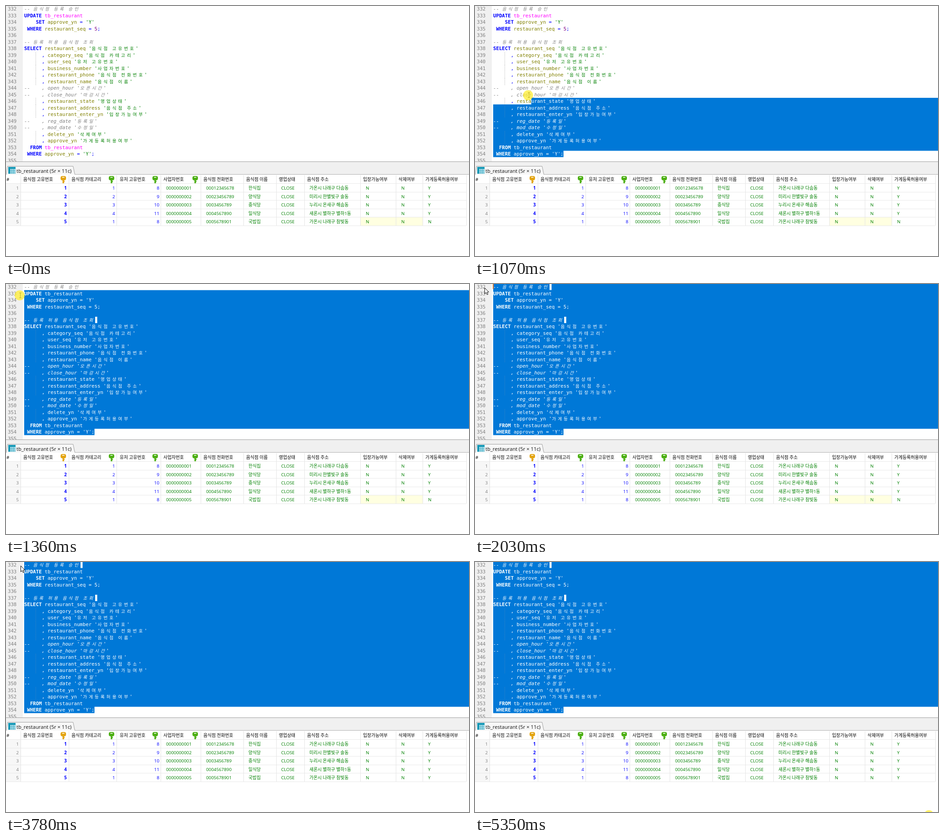
Recreate the animation shown at these times as an HTML page with a canvas. Size 1018 px wide and 550 px high, loop 5420 ms.

```html
<!DOCTYPE html>
<html lang="ko">
<head>
<meta charset="utf-8">
<style>
html, body { margin: 0; width: 100%; height: 100%; overflow: hidden; background: #fff; }
canvas { display: block; }
</style>
</head>
<body>
<canvas id="stage" width="1018" height="550"></canvas>
<script>
const ctx = document.getElementById('stage').getContext('2d');
const LOOP = 5420, COL = 6.44, LEFT = 40, ROW = 14.5, FIRST = 332;
const MONO = '"DejaVu Sans Mono", "Noto Sans CJK KR", monospace';
const SANS = '"Open Sans", "Noto Sans CJK KR", "Noto Sans CJK", sans-serif';

const code = `-- 음식점 등록 승인
UPDATE tb_restaurant
    SET approve_yn = 'Y'
 WHERE restaurant_seq = 5;

-- 등록 허용 음식점 조회
SELECT restaurant_seq '음식점 고유번호'
      , category_seq '음식점 카테고리'
      , user_seq '유저 고유번호'
      , business_number '사업자번호'
      , restaurant_phone '음식점 전화번호'
      , restaurant_name '음식점 이름'
--    , open_hour '오픈시간'
--    , close_hour '마감시간'
      , restaurant_state '영업상태'
      , restaurant_address '음식점 주소'
      , restaurant_enter_yn '입장가능여부'
--    , reg_date '등록일'
--    , mod_date '수정일'
      , delete_yn '삭제여부'
      , approve_yn '가게등록허용여부'
  FROM tb_restaurant
 WHERE approve_yn = 'Y';
`.split('\n');

const isHangul = ch => /[가-힣]/.test(ch);
const tokenColor = s =>
  s.startsWith('--') ? '#808080' :
  /^[A-Z]/.test(s) ? '#0000ff' :
  s.startsWith('tb_') ? '#ff00ff' :
  s.startsWith("'") ? '#008000' :
  /^\d/.test(s) ? '#800080' :
  /^\w/.test(s) ? '#808000' : '#0000ff';

// Each line becomes a list of glyphs on a column grid; Hangul takes two columns.
const lines = code.map(text => {
  const glyphs = [];
  let col = 0;
  for (const [token] of text.matchAll(/^--.*|'[^']*'|\w+|\s+|./g)) {
    const color = tokenColor(token);
    const style = token.startsWith('--') ? 'italic ' : /^[A-Z]/.test(token) ? 'bold ' : '';
    for (const ch of token) {
      if (ch !== ' ') glyphs.push({ ch, col, color, font: `${style}${isHangul(ch) ? 9.6 : 10.7}px ${MONO}` });
      col += isHangul(ch) ? 2 : 1;
    }
  }
  return { text, glyphs, length: col };
});
const LAST = lines.length - 2;

const columns = [
  // title, title x, right border, value x, values
  ['음식점 고유번호', 38, 138, 133.5, '1 2 3 4 5'],
  ['음식점 카테고리', 144, 243, 239.5, '1 2 3 4 1'],
  ['유저 고유번호', 250, 340, 337, '8 9 10 11 8'],
  ['사업자번호', 346, 428, 352, '0000000001 0000000002 0000000003 0000000004 0000000005'],
  ['음식점 전화번호', 434, 522, 440, '00012345678 00023456789 0003456789 0004567890 0005678901'],
  ['음식점 이름', 528, 594, 533, '한식집 양식당 중식당 일식당 국밥집'],
  ['영업상태', 600, 656, 605, 'CLOSE CLOSE CLOSE CLOSE CLOSE'],
  ['음식점 주소', 662, 779, 667, '가온시_나래구_다솜동 미리시_한별빛구_솔동 누리시_온새구_해솜동 새론시_별하구_별하1동 가온시_나래구_참빛동'],
  ['입장가능여부', 785, 857, 791, 'N N N N N'],
  ['삭제여부', 863, 916, 869, 'N N N N N'],
  ['가게등록허용여부', 922, 1012, 928, 'Y Y Y Y Y']
].map(([title, x, border, valueX, values]) => ({ title, x, border, valueX, values: values.split(' ') }));

// time, x, y, eased
const path = [
  [160, 886, 523], [630, 271, 337, 1], [830, 271, 337], [1070, 118, 197], [1345, 31, 25],
  [1390, 31, 25], [1880, 18, 8, 1], [1950, 18, 8], [2230, 32, 8, 1], [4109, 32, 8],
  [4110, 29, 8], [4520, 29, 8], [4940, 893, 421, 1]
];

function pointerAt(t) {
  const i = path.findIndex(p => p[0] > t);
  if (i < 0) return path[path.length - 1].slice(1, 3);
  if (i === 0) return path[0].slice(1, 3);
  const [t0, x0, y0] = path[i - 1], [t1, x1, y1, eased] = path[i];
  let k = (t - t0) / (t1 - t0);
  if (eased) k = k * k * (3 - 2 * k);
  return [x0 + (x1 - x0) * k, y0 + (y1 - y0) * k];
}

function rect(x, y, w, h, color) {
  ctx.fillStyle = color;
  ctx.fillRect(x, y, w, h);
}

function label(text, x, y, color, font, align = 'left') {
  ctx.font = font;
  ctx.fillStyle = color;
  ctx.textAlign = align;
  ctx.fillText(text, x, y);
}

function shape(points, fill, stroke) {
  ctx.beginPath();
  points.forEach(([x, y]) => ctx.lineTo(x, y));
  if (fill) { ctx.closePath(); ctx.fillStyle = fill; ctx.fill(); }
  if (stroke) { ctx.strokeStyle = stroke; ctx.lineWidth = 1; ctx.stroke(); }
}

// The selection follows the drag with a small lag.
function selectionStart(t) {
  if (t < 843) return { row: LAST, col: lines[LAST].length };
  const [x, y] = pointerAt(Math.min(t - 13, 1930));
  const row = Math.max(0, Math.min(LAST, Math.floor((y + 1) / ROW)));
  const col = Math.max(0, Math.min(lines[row].length, Math.round((x - LEFT) / COL)));
  return { row, col };
}

function drawEditor(t) {
  const start = selectionStart(t);
  ctx.save();
  ctx.beginPath();
  ctx.rect(0, 0, 1018, 342);
  ctx.clip();
  rect(0, 0, 37, 342, '#f0f0f0');
  lines.forEach((line, row) => {
    const top = row * ROW - 1, base = top + 11;
    const from = row < start.row || row > LAST ? Infinity : row === start.row ? start.col : 0;
    label(FIRST + row, 4, base, '#808080', `10.7px ${MONO}`);
    if (from < Infinity) {
      const x = LEFT + from * COL;
      const right = row === LAST ? LEFT + line.length * COL : 1018;
      rect(x, top, right - x, ROW + (row < LAST ? 0.5 : 0), '#0078d7');
      if (/^-- /.test(line.text) && /[가-힣]$/.test(line.text))
        rect(LEFT + line.length * COL + 1.5, top + 0.5, 4.5, ROW - 0.5, '#fff');
    }
    if (line.text.startsWith('      ,'))
      for (let y = 0; y < ROW; y += 2) rect(65, Math.round(top) + y, 1, 1, from === 0 ? '#3a86c4' : '#b4b4b4');
    for (const g of line.glyphs)
      label(g.ch, LEFT + g.col * COL + (isHangul(g.ch) ? 0.5 : 0), base, g.col >= from ? '#fff' : g.color, g.font);
  });
  const caret = [[1960, 2490], [3010, 3780], [4320, 4850]].some(([a, b]) => t >= a && t < b);
  if (caret) rect(39, 0, 2, 11, '#f08030');
  ctx.restore();
}

function drawTab() {
  rect(0, 342, 1018, 29, '#f0f0f0');
  rect(0, 342, 1018, 1, '#a0a0a0');
  rect(150, 370, 868, 1, '#b0b0b0');
  shape([[0.5, 371], [3.5, 352.5], [147.5, 352.5], [151.5, 371]], '#f7f7f7');
  shape([[0.5, 371], [3.5, 352.5], [147.5, 352.5], [151.5, 371]], null, '#a0a0a0');
  rect(5, 354, 16, 15, '#1597b5');
  for (let i = 0; i < 9; i++)
    rect(9.5 + i % 3 * 4, 358.5 + Math.floor(i / 3) * 3.6, 3, 2.7, '#d5f1f8');
  label('tb_restaurant (5r × 11c)', 23, 367, '#111', `11.2px ${SANS}`);
}

function drawKey(x, color) {
  ctx.fillStyle = color;
  ctx.beginPath();
  ctx.roundRect(x - 6, 374, 12, 9.5, 4);
  ctx.fill();
  rect(x - 1.7, 383, 3.4, 7, color);
  rect(x + 1, 385, 2, 2, color);
  rect(x - 2.5, 376, 5, 1.6, '#fff');
}

function drawGrid(t) {
  const pending = t < 3190, font = `9.8px ${SANS}`;
  const rowTop = i => 391 + i * 18.5;
  rect(0, 371, 1018, 179, '#fff');
  rect(0, 391, 33, 92, '#f7f7f7');
  if (pending) rect(779, rowTop(4), 137, 18.5, '#ffffe1');
  for (let i = 0; i <= 5; i++) rect(0, Math.round(rowTop(i)) - 1, 1012, 1, '#e9e9e9');
  rect(32, 372, 1, 111, '#e4e4e4');
  label('#', 1, 384.5, '#000', font);
  for (let r = 0; r < 5; r++) label(r + 1, 28, rowTop(r) + 13, '#808080', font, 'right');
  columns.forEach(({ title, x, border, valueX, values }, c) => {
    rect(border, 372, 1, 111, '#e4e4e4');
    label(title, x, 384.5, '#000', font);
    values.forEach((value, r) => {
      const text = pending && c === 10 && r === 4 ? 'N' : value.replaceAll('_', ' ');
      label(text, valueX, rowTop(r) + 13, c < 3 ? '#0000ff' : '#008000',
        (c ? '' : 'bold ') + font, c < 3 ? 'right' : 'left');
    });
  });
  [126, 232, 328, 416].forEach((x, i) => drawKey(x, i ? '#4caf13' : '#e3a411'));
}

function drawHalo(x, y) {
  ctx.fillStyle = 'rgba(255, 238, 50, 0.75)';
  ctx.beginPath();
  ctx.arc(x, y, 11, 0, 7);
  ctx.fill();
}

function drawPointer(t) {
  const dragging = t >= 830 && t < 1950;
  const [x, y] = pointerAt(t);
  if (t >= 160 && t < 5320) {
    if (y > 342 || (x < 36 && !dragging)) {
      const arrow = [[0, 0], [0, 13], [3, 10.3], [5.2, 15], [7.3, 14], [5.2, 9.5], [9, 9.2], [0, 0]];
      shape(arrow.map(([dx, dy]) => [x + dx + 0.5, y + dy + 0.5]), '#fff', '#000');
    } else {
      const bx = Math.round(x), by = Math.round(y);
      ctx.globalCompositeOperation = 'difference';
      rect(bx, by - 5, 1, 10, '#fff');
      rect(bx - 2, by - 6, 5, 1, '#fff');
      rect(bx - 2, by + 5, 5, 1, '#fff');
      ctx.globalCompositeOperation = 'source-over';
    }
  }
  if (dragging) drawHalo(x - 1, y);
  if (t >= 5350) drawHalo(998, 557);
}

function draw(now) {
  const t = now % LOOP;
  rect(0, 0, 1018, 550, '#fff');
  drawEditor(t);
  drawTab();
  drawGrid(t);
  drawPointer(t);
  requestAnimationFrame(draw);
}
requestAnimationFrame(draw);
</script>
</body>
</html>
```
